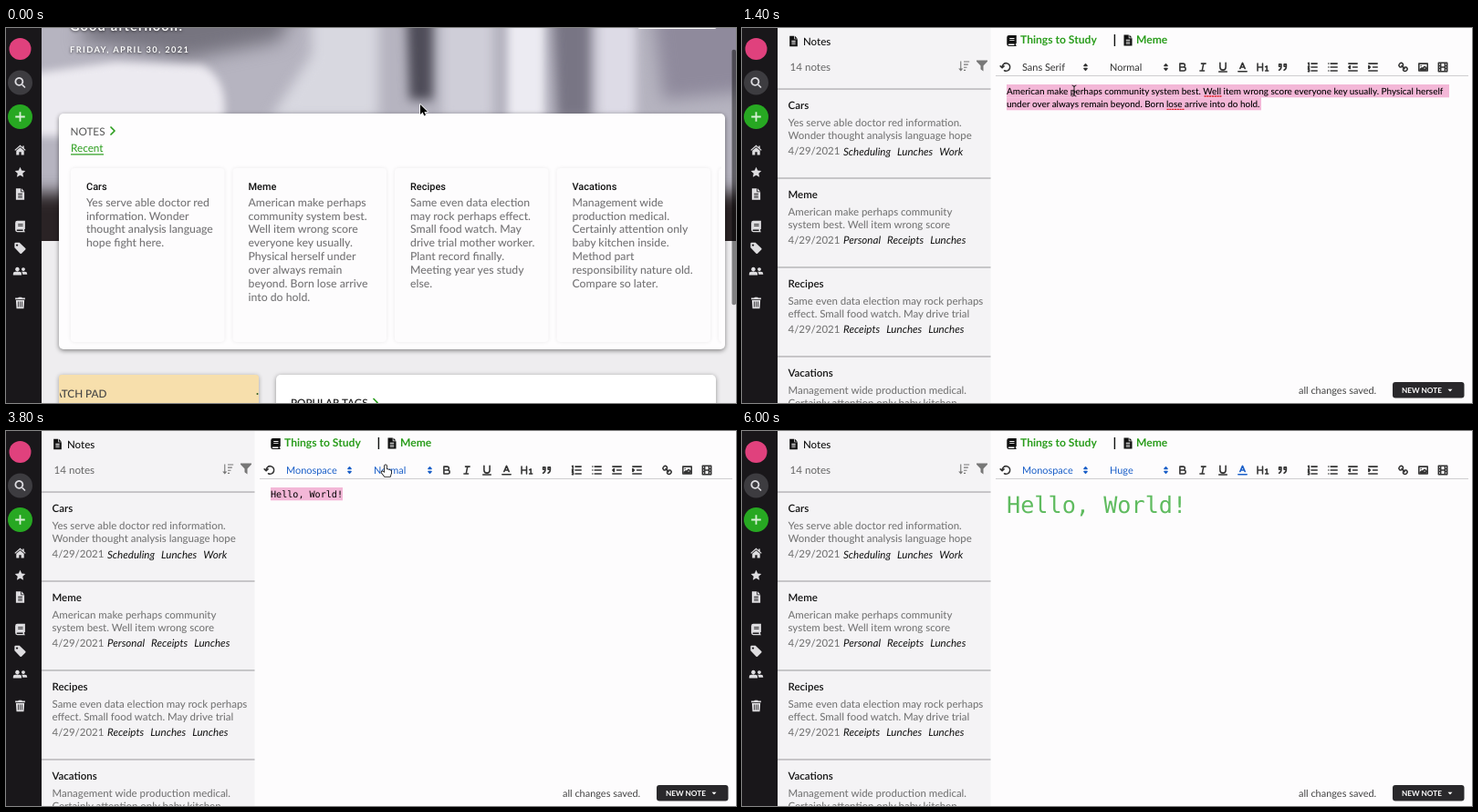
An HTML page with a canvas for the animation above (6100 ms loop, 800x412 px).

```html
<!DOCTYPE html>
<html lang="en">
<head>
<meta charset="utf-8">
<title>Notes app</title>
<style>
html, body { margin: 0; width: 100%; height: 100%; overflow: hidden; }
canvas { display: block; }
</style>
</head>
<body>
<canvas id="stage" width="800" height="412"></canvas>
<script>
const ctx = document.getElementById('stage').getContext('2d');
const LOOP = 6100, STEP = 100;
const GREEN = '#2a9d1c', BLUE = '#1a5fc8', PINK = '#f3b7d7', LEAF = '#5fbb5f';

// Solid icons on a 16 unit grid
const solid = {
  home: 'M8 1L0 8l1 1 7-6 7 6 1-1-2.5-2.2V2h-2v2zM8 4.3L2.5 9v6h4v-4h3v4h4V9z',
  star: 'M8 .5l2.2 4.8 5.3.6-3.9 3.6 1.1 5.2L8 12.1l-4.7 2.6 1.1-5.2L.5 5.9l5.3-.6z',
  file: 'M2 0h7v5h5v11H2zM10 0l4 4h-4zM5 7h6v1.2H5zM5 9.5h6v1.2H5zM5 12h6v1.2H5z',
  book: 'M4 0h11v12h-1v3h1v1H4a3 3 0 0 1-3-3V3a3 3 0 0 1 3-3zM4 12.5h8v2H4a1 1 0 0 1 0-2zM5 4h7v1.2H5zM5 6.5h7v1.2H5z',
  tag: 'M0 1.5A1.5 1.5 0 0 1 1.5 0H7l8.5 8a1.5 1.5 0 0 1 0 2l-5.5 5.5a1.5 1.5 0 0 1-2 0L0 7zM3.5 2a1.5 1.5 0 1 0 .01 0z',
  users: 'M4 2.5a3 3 0 1 0 .01 0zM12.5 3a2.5 2.5 0 1 0 .01 0zM-2 14v-2a3 3 0 0 1 3-3h6a3 3 0 0 1 3 3v2zM11.5 13H18v-1a3 3 0 0 0-3-3h-5a5 5 0 0 1 1.5 3z',
  trash: 'M1 1h4l1-1h4l1 1h4v2H1zM2 4h12l-.8 12H2.8zM5 6h1v8H5zM7.5 6h1v8h-1zM10 6h1v8h-1z',
  search: 'M6.5 0a6.5 6.5 0 1 0 .01 0zM6.5 2.4a4.1 4.1 0 1 1-.01 0zM10 11.5l1.5-1.5 4.5 4.5-1.5 1.5z',
  plus: 'M6.8 1h2.4v5.8H15v2.4H9.2V15H6.8V9.2H1V6.8h5.8z',
  filter: 'M0 0h16v1.5L10 8v8l-4-3V8L0 1.5z',
  sort: 'M2.5 0h1.6v11.5H7L3.3 16-.4 11.5h2.9zM8 0h9v1.6H8zM8 4.5h7v1.6H8zM8 9h5v1.6H8zM8 13.5h3v1.6H8z',
  edit: 'M0 3h8L6 5H2v9h9v-4l2-2v8H0zM12 0l4 4-7.5 7.5-4.5.5.5-4.5z'
};

// Toolbar icons on an 18 unit grid, with their centres
const tools = [
  [289, 'M4 9A5.5 5.5 0 1 1 7 13.8M1.5 7.5L4 10 6.5 7.5'],
  [483, 'M5 4H9.5a2.5 2.5 0 0 1 0 5H5zM5 9h5.5a2.5 2.5 0 0 1 0 5H5z'],
  [505, 'M7 4H13M5 14H11M8 14L10 4'],
  [527, 'M5 3V9a4 4 0 0 0 8 0V3M3.5 15.5H14.5'],
  [548.5, 'M3 15H15M5.5 11L9 3 12.5 11M11.6 9H6.4'],
  [570.5, 'M2 4V14M2 9H9M9 4V14M13 8.5l2-1V14M13 14h4'],
  [592.5, 'M4 5H7V8H4zM11 5h3v3h-3zM7 8c0 4-3 5-3 5M14 8c0 4-3 5-3 5'],
  [625.5, 'M7 4H15M7 9H15M7 14H15M2.5 3.5l1-.5V6M2.5 8H4L2.5 10.5H4M2.5 12.5H4V15H2.5'],
  [647.5, 'M6 4H15M6 9H15M6 14H15M3 4h.01M3 9h.01M3 14h.01'],
  [669.5, 'M3 14H15M3 4H15M9 9H15M5 7V11L3 9z'],
  [691.5, 'M3 14H15M3 4H15M9 9H15M3 7V11L5 9z'],
  [724.5, 'M7 7l4 4M8.9 4.6a3.5 3.5 0 0 1-4.3 4.3C3.2 7.5 2 6.4 4.2 4.2S7.5 3.2 8.9 4.6zM13.4 9.1a3.5 3.5 0 0 0-4.3 4.3c1.4 1.4 2.5 2.5 4.7.4S14.8 10.5 13.4 9.1z'],
  [746.5, 'M3 4H15V14H3zM6 7h.01M5 12l2-2 1 1 3-3 2 2v2z'],
  [768, 'M3 3H15V15H3zM6 3V15M12 3V15M3 7H6M3 11H6M12 7h3M12 11h3M6 9h6']
];

const palette = ('000 e60000 f90 ff0 008a00 06c 93f fff facccc ffebcc ffffcc cce8cc cce0f5 ebd6ff ' +
  'bbb f06666 ffc266 ffff66 66b966 66a3e0 c285ff 888 a10000 b26b00 b2b200 006100 0047b2 6b24b2 ' +
  '444 5c0000 663d00 666600 003700 002966 3d1466').split(' ');

const notes = [
  ['Cars', 'Yes serve able doctor red|information. Wonder|thought analysis language|hope fight here.',
    'Yes serve able doctor red information.|Wonder thought analysis language hope', 'Scheduling|Lunches|Work'],
  ['Meme', 'American make perhaps|community system best.|Well item wrong score|everyone key usually.|Physical herself under|over always remain|beyond. Born lose arrive|into do hold.',
    'American make perhaps community|system best. Well item wrong score', 'Personal|Receipts|Lunches'],
  ['Recipes', 'Same even data election|may rock perhaps effect.|Small food watch. May|drive trial mother worker.|Plant record finally.|Meeting year yes study|else.',
    'Same even data election may rock perhaps|effect. Small food watch. May drive trial', 'Receipts|Lunches|Lunches'],
  ['Vacations', 'Management wide|production medical.|Certainly attention only|baby kitchen inside.|Method part|responsibility nature old.|Compare so later.',
    'Management wide production medical.|Certainly attention only baby kitchen', '']
];

// Pointer path: time, x, y, shape
const pointer = [
  [0, 454, 84, 'arrow'], [300, 330, 270, 'hand'], [700, 330, 270, 'beam'], [800, 330, 262, 'beam'],
  [1200, 364, 69, 'beam'], [1600, 364, 69, 'beam'], [1800, 372, 110, 'none'], [3100, 292, 69, 'beam'],
  [3200, 335, 42, 'hand'], [3300, 335, 42, 'hand'], [3500, 326, 106, 'hand'], [3600, 326, 106, 'hand'],
  [3800, 416, 38, 'hand'], [3900, 416, 38, 'hand'], [4100, 420, 142, 'hand'], [4200, 420, 142, 'hand'],
  [4400, 550, 40, 'hand'], [4900, 550, 40, 'hand'], [5200, 612, 92, 'hand'], [5300, 612, 92, 'hand'],
  [5600, 470, 84, 'beam'], [5800, 470, 84, 'none']
];

function text(str, x, y, size, color, style = '', family = 'Lato, sans-serif', spacing = 0) {
  ctx.font = `${style} ${size}px ${family}`;
  ctx.letterSpacing = spacing + 'px';
  ctx.fillStyle = color;
  ctx.fillText(str, x, y);
  return ctx.measureText(str).width;
}
function rect(x, y, w, h, color) {
  ctx.fillStyle = color;
  ctx.fillRect(x, y, w, h);
}
function panel(x, y, w, h, r, color, shadow, blur = 5, dy = 1) {
  ctx.save();
  if (shadow) Object.assign(ctx, { shadowColor: shadow, shadowBlur: blur, shadowOffsetY: dy });
  ctx.fillStyle = color;
  ctx.beginPath();
  ctx.roundRect(x, y, w, h, r);
  ctx.fill();
  ctx.restore();
}
function disc(x, y, r, color) {
  panel(x - r, y - r, 2 * r, 2 * r, r, color);
}
function icon(name, x, y, size, color) {
  ctx.save();
  ctx.translate(x - size / 2, y - size / 2);
  ctx.scale(size / 16, size / 16);
  ctx.fillStyle = color;
  ctx.fill(new Path2D(solid[name]), 'evenodd');
  ctx.restore();
}
function line(d, x, y, scale, color, width = 2) {
  ctx.save();
  ctx.translate(x, y);
  ctx.scale(scale, scale);
  Object.assign(ctx, { strokeStyle: color, lineWidth: width, lineCap: 'round', lineJoin: 'round' });
  ctx.stroke(new Path2D(d));
  ctx.restore();
}
const chevron = (x, y) => line('M-2-4L2 0-2 4', x, y, 1, GREEN, 1.7);

// Out-of-focus desk behind the greeting
const hero = document.createElement('canvas');
hero.width = 800;
hero.height = 265;
(function paintHero() {
  const h = hero.getContext('2d');
  h.fillStyle = '#b6b4c0';
  h.fillRect(0, 0, 800, 265);
  const blob = (color, blur, d) => {
    h.filter = `blur(${blur}px)`;
    h.fillStyle = color;
    h.fill(new Path2D(d));
  };
  blob('#76747f', 10, 'M105-20H330L300 45 200 65 80 45z');
  blob('#eceaf0', 5, 'M0 85L120 68 215 72Q250 90 235 150H0z');
  blob('#d8d8e0', 7, 'M335-20H408V130H290L335 60z');
  blob('#4e4c58', 6, 'M438-20H468V110H442z');
  blob('#cfced8', 6, 'M478-20H533V130H478z');
  blob('#ecebf2', 5, 'M550-20H590V130H550z');
  blob('#787584', 6, 'M598-20H640V130H604z');
  blob('#dddbe6', 6, 'M648-20H690V130H648z');
  blob('#8f8a9c', 9, 'M705-20H820V100L720 110z');
  blob('#2a2325', 9, 'M0 212H820V300H0z');
})();

function dashboard(t) {
  const scroll = 31 * Math.max(0, 1 - t / 300);
  rect(39, 0, 761, 412, '#eeedef');
  ctx.save();
  ctx.translate(0, -scroll);
  ctx.drawImage(hero, 0, 0);
  ctx.save();
  Object.assign(ctx, { shadowColor: '#0009', shadowBlur: 3, shadowOffsetY: 1 });
  text('Good afternoon!', 70, 34, 14.5, '#fff', '700', undefined, 1.17);
  text('FRIDAY, APRIL 30, 2021', 70, 58, 9.3, '#fff', '700', undefined, 1.4);
  ctx.restore();
  panel(692, 16, 87, 16, 3, '#fff');
  icon('edit', 709, 24, 11, '#111');
  text('Customize', 721, 28, 10.5, '#111', '500');

  panel(58, 125, 730, 259, 5, '#fefdfe', '#0007', 5, 1.5);
  text('NOTES', 70.5, 148.5, 11.72, '#555');
  chevron(117, 144);
  text('Recent', 71, 167, 11.72, GREEN);
  rect(71, 169.3, 36, 1.2, GREEN);
  ctx.save();
  ctx.beginPath();
  ctx.rect(66, 176, 718, 204);
  ctx.clip();
  for (let i = 0; i < 5; i++) {
    const x = 71 + 177.5 * i, hovered = i === 1 && scroll === 0;
    panel(x, 185, 168.5, 191, 4, '#fdfcfd', hovered ? '#0002' : '#00000014', 4, 0);
    if (!notes[i]) break;
    text(notes[i][0], x + 17, 209, 10.94, '#111', '500', 'Roboto, sans-serif');
    notes[i][1].split('|').forEach((row, k) => text(row, x + 17, 226.7 + 14.84 * k, 12.25, '#757476', '500'));
  }
  ctx.restore();

  panel(58, 412, 219, 100, 3, '#f7dfac', '#0005');
  panel(296, 412, 482, 100, 5, '#fff', '#0006');
  ctx.save();
  ctx.beginPath();
  ctx.rect(59, 412, 220, 60);
  ctx.clip();
  text('SCRATCH PAD', 32, 437, 11.72, '#444', '500');
  disc(275.5, 433, 1, '#2b5a20');
  ctx.restore();
  text('POPULAR TAGS', 312, 446.5, 11.6, '#222', '600');
  chevron(405, 442.5);
  ctx.restore();
  ctx.globalAlpha = Math.max(0, Math.min(1, (500 - t) / 250));
  panel(795.5, scroll * 0.77, 4.5, 280 + scroll * 0.01, 2, '#0007');
  ctx.globalAlpha = 1;
}

function sidebar() {
  rect(0, 0, 39, 412, '#19171a');
  disc(15.5, 23, 12, '#e0417d');
  disc(15.5, 60, 13.5, '#3d3c40');
  icon('search', 15.5, 60, 12, '#dddce0');
  disc(15.5, 97.5, 13.5, '#27a822');
  icon('plus', 15.5, 97.5, 12, '#d8f0d6');
  const items = { home: 134, star: 158.5, file: 182.5, book: 218, tag: 242, users: 267, trash: 302 };
  for (const name in items) icon(name, 15.5, items[name], 12.3, '#dedde0');
}

function noteList() {
  rect(39, 0, 233.5, 412, '#f4f3f5');
  icon('file', 56.5, 14.5, 11.5, '#111');
  text('Notes', 67, 18.5, 11.5, '#111', '500');
  text('14 notes', 52.5, 47.3, 11.6, '#666');
  icon('sort', 243, 42, 11, '#777');
  icon('filter', 263, 41.5, 12, '#777');
  notes.forEach(([title, , preview, tags], i) => {
    const y = 67 + 97.97 * i;
    rect(39, y - 0.7, 233.5, 1.5, '#b8b7ba');
    text(title, 50.5, y + 22.3, 11.5, '#111', '600');
    preview.split('|').forEach((row, k) => text(row, 50.5, y + 41 + 14.2 * k, 11.45, '#777', '500'));
    text('4/29/2021', 50.5, y + 72.3, 11.45, '#777', '500');
    let x = 111;
    for (const tag of tags.split('|')) x += text(tag, x, y + 72.5, 11.6, '#111', 'italic') + 7;
  });
}

function picker(label, x, arrowX, color, open) {
  if (open) panel(x - 7, 33, arrowX - x + 14, 19, 0, '#fdfcfd', '#0006', 2, 0);
  text(label, x, 46.7, 10.94, color);
  line('M-2 2L0 4 2 2zM-2-2L0-4 2-2z', arrowX, 43, 0.78, color);
}
function menu(x, w, rows, bottom, current) {
  panel(x, 51.5, w, bottom - 51.5, 0, '#fff', '#0006', 4, 1);
  for (const [label, y, size, family] of rows)
    text(label, x + 7, y, size, label === current ? BLUE : '#333', '', family);
}

function editor(t) {
  const within = (a, b) => t >= a && t < b;
  const huge = t >= 4200, mono = t >= 3600;
  const fontOpen = within(3300, 3600), sizeOpen = within(3900, 4200), colorOpen = within(4400, 5300);
  const active = within(3600, 3900) || within(4200, 4400) || t >= 5300;
  const tint = (open, lit) => open ? '#bbb' : lit ? BLUE : '#333';

  rect(272, 0, 528, 412, '#fdfcfd');
  noteList();
  icon('book', 295.5, 14, 12, '#111');
  text('Things to Study', 305, 16.5, 12.1, GREEN, '700');
  rect(407.7, 7, 1.4, 13, '#111');
  icon('file', 423, 13.5, 12, '#111');
  text('Meme', 432, 16.5, 12.1, GREEN, '700');

  picker(mono ? 'Monospace' : 'Sans Serif', 307, 376.5, tint(fontOpen, active || within(3200, 3300)), fontOpen);
  picker(huge ? 'Huge' : 'Normal', 403, 464.5, tint(sizeOpen, within(3800, 3900) || huge && active), sizeOpen);
  if (colorOpen) panel(538.5, 33, 21, 19, 0, '#fdfcfd', '#0006', 2, 0);
  for (const [x, d] of tools)
    line(d, x - 7, 36, 0.78, x === 548.5 ? tint(colorOpen, within(4300, 4400) || t >= 5300) : '#333');
  rect(278, 52, 518, 1, '#cfced0');

  const selected = within(1300, 1700) || within(3100, 3300) || within(3600, 3900) || within(4200, 4400) || within(5300, 5800);
  if (t < 1700) {
    if (selected) {
      rect(290, 62, 485, 14.3, PINK);
      rect(290, 76.3, 279, 14, PINK);
    }
    text('American make perhaps community system best. Well item wrong score everyone key usually. Physical herself', 290, 73, 9.95, '#000', '500');
    text('under over always remain beyond. Born lose arrive into do hold.', 290, 87.3, 9.95, '#000', '500');
    for (const [x, y] of [[507, 75], [466, 89.3]]) {
      ctx.setLineDash([1.2, 1.6]);
      line('M0 0H18', x, y, 1, '#e0222a', 1.3);
      ctx.setLineDash([]);
    }
  } else {
    const typed = 'Hello, World!'.slice(0, Math.max(0, Math.floor((t - 1700) / 90)));
    const size = huge ? 25.2 : 10.1;
    if (selected) rect(290, 62, huge ? 197 : mono ? 79 : 59, huge ? 36 : 14.3, PINK);
    const width = text(typed, 290, huge ? 89.5 : 73, size, t >= 5300 ? LEAF : '#000', mono ? '' : '500',
      mono ? '"DejaVu Sans Mono", monospace' : undefined);
    if (t < 3100) rect(290 + width, 63, 1, 12.5, '#111');
  }

  if (fontOpen) menu(300, 84, [['Sans Serif', 66.5, 10.94], ['Serif', 89, 10.94, 'Liberation Serif, serif'],
    ['Monospace', 111.5, 10.94, '"DejaVu Sans Mono", monospace']], 126, t < 3500 ? 'Sans Serif' : 'Monospace');
  if (sizeOpen) menu(396, 77, [['Small', 65, 7.8], ['Normal', 84, 10.16], ['Large', 108, 14.06], ['Huge', 147, 25]],
    167, t < 4100 ? 'Normal' : 'Huge');
  if (colorOpen) {
    panel(538.5, 51.5, 117, 83.5, 0, '#fff', '#0006', 4, 1);
    palette.forEach((c, i) => rect(544 + 15.62 * (i % 7), 56 + 15.62 * Math.floor(i / 7), 12.5, 12.5, '#' + c));
  }

  text('all changes saved.', 610, 402, 10.94, '#444');
  panel(713, 389, 78.5, 17.5, 3, '#29282b');
  text('NEW NOTE', 723, 400.8, 8.2, '#fff', '700');
  ctx.fill(new Path2D('M773.5 396.7h5l-2.5 2.8z'));
}

function drawPointer(t) {
  let i = pointer.length - 1;
  while (pointer[i][0] > t) i--;
  const [t0, x0, y0, shape] = pointer[i], [t1, x1, y1] = pointer[i + 1] || [LOOP, x0, y0];
  const k = (t - t0) / (t1 - t0);
  if (shape === 'none') return;
  ctx.save();
  ctx.translate(x0 + (x1 - x0) * k, y0 + (y1 - y0) * k);
  if (shape === 'beam') {
    line('M-2-6Q0-6 0-4Q0-6 2-6M0-4V4M-2 6Q0 6 0 4Q0 6 2 6M-1.5 1H1.5', 0, 0, 1, '#222', 1);
  } else {
    const path = new Path2D(shape === 'arrow'
      ? 'M0 0V11L2.6 8.6 4.3 12.4 6 11.6 4.4 8H8z'
      : 'M-1 0Q0-1.3 1 0V4L5 5Q6.5 5.5 6.2 7.5L5 12H-1L-4.5 7.5Q-4.5 6-2.8 6.5L-1 8z');
    Object.assign(ctx, { lineWidth: 1.6, lineJoin: 'round' });
    ctx.strokeStyle = shape === 'arrow' ? '#fff' : '#111';
    ctx.fillStyle = shape === 'arrow' ? '#000' : '#fff';
    ctx.stroke(path);
    ctx.fill(path);
  }
  ctx.restore();
}

function frame() {
  const t = Math.floor(performance.now() % LOOP / STEP) * STEP;
  ctx.textRendering = 'geometricPrecision';
  if (t < 600) dashboard(t);
  else editor(t);
  sidebar();
  drawPointer(t);
  requestAnimationFrame(frame);
}
frame();
</script>
</body>
</html>
```
